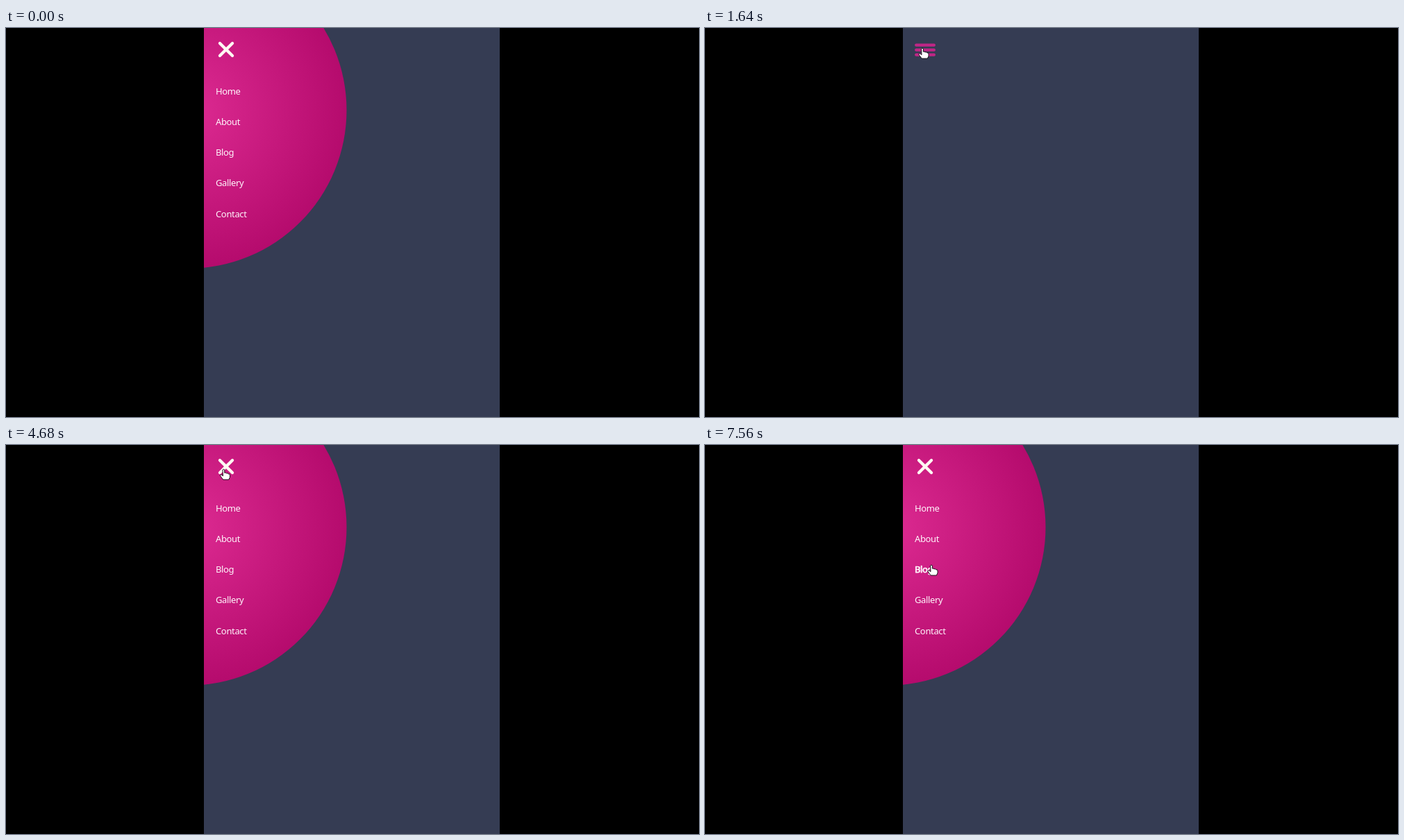
An HTML page with a canvas for the animation above (8 s loop, 998 by 561 pixels).

```html
<!DOCTYPE html>
<html lang="en">
<head>
<meta charset="utf-8">
<title>Circle menu</title>
<style>
  html, body { margin: 0; width: 100%; height: 100%; overflow: hidden; background: #000; }
  canvas { display: block; }
</style>
</head>
<body>
<canvas id="stage" width="998" height="561"></canvas>
<script>
const ctx = document.getElementById('stage').getContext('2d');
const LOOP = 8000, STEP = 40;
const CLOSE = 1275, OPEN = 3852, DURATION = 230;
const LEFT = 285, WIDTH = 426, HEIGHT = 561;
const LINKS = ['Home', 'About', 'Blog', 'Gallery', 'Contact'];
const linkY = i => 95.5 + 44.25 * i;

// Each pointer move eases to its stop, then rests there
const MOVES = [
  { from: 120, to: 480, x: 345, y: 62 },
  { from: 700, to: 1000, x: 313, y: 29 },
  { from: 3880, to: 4030, x: 312, y: 25 },
  { from: 4580, to: 5040, x: 324, y: 107 },
  { from: 5320, to: 6320, x: 319, y: 141 },
  { from: 6980, to: 7560, x: 326, y: 173 }
];

const clamp = v => Math.min(1, Math.max(0, v));
const mix = (a, b, k) => a + (b - a) * k;
const smooth = v => { const k = clamp(v); return k * k * (3 - 2 * k); };

// CSS "ease" curve
function ease(x) {
  if (x <= 0 || x >= 1) return clamp(x);
  const axis = (s, a, b) => 3 * s * (1 - s) ** 2 * a + 3 * s * s * (1 - s) * b + s ** 3;
  let lo = 0, hi = 1;
  for (let i = 0; i < 20; i++) {
    const mid = (lo + hi) / 2;
    if (axis(mid, 0.25, 0.25) < x) lo = mid; else hi = mid;
  }
  return axis(lo, 0.1, 1);
}

function openness(t) {
  return t < OPEN ? 1 - ease((t - CLOSE) / DURATION) : ease((t - OPEN) / DURATION);
}

function pointerAt(t) {
  let x = 268, y = 110;
  for (const m of MOVES) {
    const k = smooth((t - m.from) / (m.to - m.from));
    x = mix(x, m.x, k);
    y = mix(y, m.y, k);
  }
  return { x, y };
}

// The disc swells early in the move, then slides left behind the links
function drawCircle(p) {
  const x = mix(342, 262, p ** 1.4);
  const y = mix(41, 118.5, smooth(p / 0.36));
  const r = 228.5 * (1 - (1 - p) ** 4.8) ** 2.3;
  if (r < 0.3) return;
  const fill = ctx.createRadialGradient(x, y, 0, x, y, r);
  fill.addColorStop(0, '#dd2b92');
  fill.addColorStop(1, '#b50b6d');
  ctx.fillStyle = fill;
  ctx.beginPath();
  ctx.arc(x, y, r, 0, Math.PI * 2);
  ctx.fill();
}

function bar(y, angle, alpha) {
  ctx.save();
  ctx.globalAlpha = alpha;
  ctx.translate(317, y);
  ctx.rotate(angle);
  ctx.beginPath();
  ctx.moveTo(-12.8, 0);
  ctx.lineTo(12.8, 0);
  ctx.stroke();
  ctx.restore();
}

function drawButton(p) {
  const k = smooth(p * 1.6);
  ctx.strokeStyle = `rgb(${mix(192, 255, k)}, ${mix(38, 250, k)}, ${mix(134, 243, k)})`;
  ctx.lineWidth = 4.3;
  ctx.lineCap = 'round';
  for (const side of [-1, 0, 1]) {
    bar(mix(31.7 + 7 * side, 31, p), side * p * Math.PI / 4, side ? 1 : 1 - p);
  }
}

function drawLinks(hovered) {
  ctx.font = '13px "Noto Sans", "Open Sans", sans-serif';
  ctx.letterSpacing = '-0.35px';
  ctx.fillStyle = ctx.strokeStyle = '#fff6fb';
  ctx.lineWidth = 0.75;
  ctx.lineJoin = 'round';
  LINKS.forEach((label, i) => {
    ctx.fillText(label, 302, linkY(i));
    if (i === hovered) ctx.strokeText(label, 302, linkY(i));
  });
}

const arrow = new Path2D('M0 0V15L3.5 11.8L6 17L8.6 15.8L6.2 10.8H11Z');
const hand = new Path2D('M-1.3 .8Q0 -.8 1.3 .8V5.2Q3.2 4.4 4 5.9Q6 5.2 6.8 6.8Q9 6.3 9 8.3V11.5L7.4 15H-.8L-4.9 9.6Q-5.5 7.4-3.5 7.8L-1.3 9.4Z');

function drawPointer(x, y, isHand) {
  const shape = isHand ? hand : arrow;
  ctx.save();
  ctx.translate(x, y);
  ctx.lineJoin = 'round';
  ctx.lineWidth = 1;
  ctx.fillStyle = isHand ? '#fff' : '#080808';
  ctx.strokeStyle = isHand ? '#181018' : '#fff';
  ctx.fill(shape);
  ctx.stroke(shape);
  ctx.restore();
}

function draw(t) {
  const p = openness(t);
  const linksShown = t < CLOSE || t >= OPEN;
  const { x, y } = pointerAt(t);
  const onButton = Math.abs(x - 317) < 18 && Math.abs(y - 32) < 15;
  const hovered = linksShown && x > 300 && x < 350
    ? LINKS.findIndex((_, i) => Math.abs(y - linkY(i) + 4) < 11.5)
    : -1;

  ctx.fillStyle = '#000';
  ctx.fillRect(0, 0, 998, HEIGHT);
  ctx.save();
  ctx.beginPath();
  ctx.rect(LEFT, 0, WIDTH, HEIGHT);
  ctx.clip();
  ctx.fillStyle = '#353c53';
  ctx.fillRect(LEFT, 0, WIDTH, HEIGHT);
  drawCircle(p);
  drawButton(p);
  if (linksShown) drawLinks(hovered);
  drawPointer(x, y, onButton || hovered >= 0);
  ctx.restore();
}

const start = performance.now();
function tick() {
  const t = (performance.now() - start) % LOOP;
  draw(Math.floor((t + 4) / STEP) * STEP % LOOP);
  requestAnimationFrame(tick);
}
tick();
</script>
</body>
</html>
```
